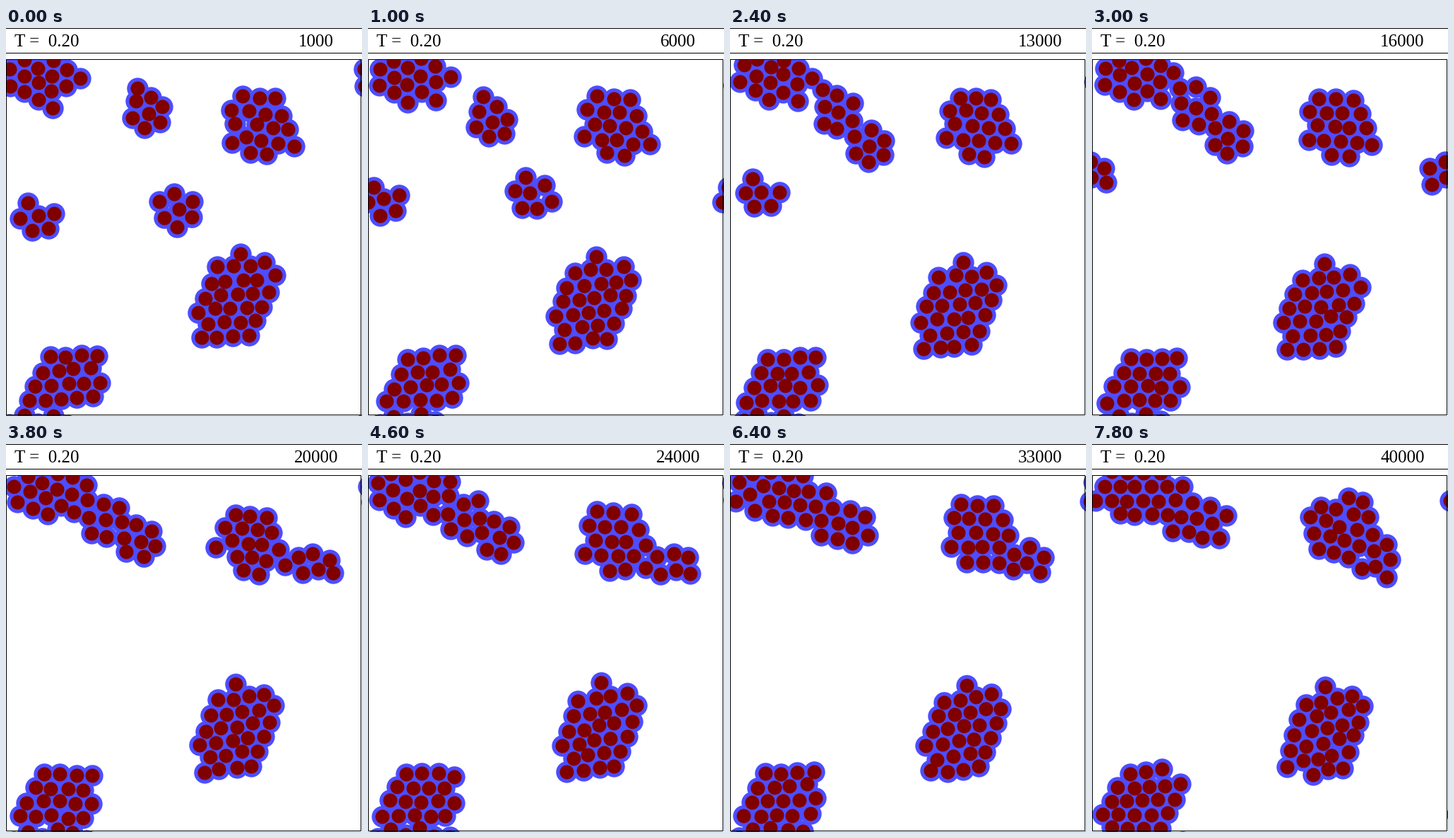
A matplotlib script that plays this animation: 504x548 px, repeating every 8 s.

```python
import numpy as np
import matplotlib.pyplot as plt
from matplotlib.animation import FuncAnimation
from matplotlib.patches import Rectangle

W, H, DPI = 504, 548, 100
PX = 72 / DPI
FRAMES, INTERVAL = 40, 200
SIDE = 502                       # edge of the periodic box
ORIGIN = np.array([0.5, 44.5])
BLUE, RED = "#4d4dff", "#800000"
GAP = 23                         # resting distance between two discs
PULL = 0.01                      # cohesion towards the cluster centre
rng = np.random.default_rng(12)


class Cluster:
    """A packed, tilted ellipse of discs that drifts along a few waypoints."""

    def __init__(self, count, tilt, aspect, way):
        self.count, self.way = count, way
        a = np.radians(tilt)
        turn = np.array([[np.cos(a), -np.sin(a)], [np.sin(a), np.cos(a)]])
        self.stiff = PULL * turn @ np.diag([1 / aspect, aspect]) @ turn.T
        self.shape = turn @ np.diag([aspect ** 0.5, aspect ** -0.5])

    def centre(self, k):
        return np.array([np.interp(k, list(self.way), axis)
                         for axis in zip(*self.way.values())])

    def seed(self):
        """Sunflower filling of the ellipse."""
        i = np.arange(self.count)
        r, a = 0.52 * GAP * np.sqrt(i + 0.5), i * np.pi * (3 - 5 ** 0.5)
        disc = np.column_stack([r * np.cos(a), r * np.sin(a)])
        return self.centre(0) + disc @ self.shape.T


clusters = [
    Cluster(18, -30, 1.35, {0: (86, 496), 12: (76, 502), 39: (71, 500)}),
    Cluster(15, 5, 1.4, {0: (50, 575), 5: (63, 571), 39: (60, 568)}),
    Cluster(8, 60, 1.3, {0: (199, 115), 5: (172, 127), 12: (148, 113),
                         39: (114, 86)}),
    Cluster(18, 35, 1.15, {0: (360, 138), 5: (351, 138), 19: (349, 140),
                           39: (356, 119)}),
    Cluster(6, 0, 1.4, {0: (42, 269), 5: (22, 245), 12: (41, 234),
                        19: (-62, 170), 39: (-107, 160)}),
    Cluster(7, 0, 1.2, {0: (242, 257), 5: (234, 234), 12: (198, 165),
                        19: (185, 133), 39: (155, 111)}),
    Cluster(28, -56, 1.4, {0: (325, 382), 5: (318, 388), 19: (325, 403),
                           39: (332, 407)}),
]
counts = [c.count for c in clusters]
stiff = np.repeat([c.stiff for c in clusters], counts, axis=0)


def centres(k):
    return np.repeat([c.centre(k) for c in clusters], counts, axis=0)


def repel(pts):
    """Push close pairs apart across the periodic box."""
    d = pts[:, None] - pts[None]
    d -= SIDE * np.round(d / SIDE)
    r = np.hypot(d[..., 0], d[..., 1])
    np.fill_diagonal(r, GAP)
    push = np.clip(GAP - r, 0, None) / np.maximum(r, 1)
    return pts + 0.25 * (push[..., None] * d).sum(1)


def settle(pts, mid, steps):
    for _ in range(steps):
        pts = repel(pts + np.einsum("nij,nj->ni", stiff, mid - pts))
    for _ in range(8):
        pts = repel(pts)
    return pts


def simulate():
    mid = centres(0)
    pts = settle(np.vstack([c.seed() for c in clusters]), mid, 200)
    path = []
    for k in range(FRAMES):
        drift = centres(k) - mid
        mid = mid + drift
        pts = settle(pts + drift + rng.normal(0, 4, pts.shape), mid, 40)
        path.append(pts + rng.normal(0, 1.1, pts.shape))
    return path


path = simulate()
tiles = SIDE * np.array([(i, j) for i in (-1, 0, 1) for j in (-1, 0, 1)])

fig = plt.figure(figsize=(W / DPI, H / DPI), dpi=DPI, facecolor="white")
ax = fig.add_axes([0, 0, 1, 1])
ax.set_xlim(0, W)
ax.set_ylim(H, 0)
ax.axis("off")


def discs(radius, color, z):
    dots = ax.scatter([], [], s=(2 * radius * PX) ** 2, color=color,
                      linewidths=0, zorder=z)
    dots.set_clip_path(Rectangle((0, 44), W, 503, transform=ax.transData))
    return dots


rims, cores = discs(15.2, BLUE, 1), discs(10, RED, 2)
for y in (0.5, 35.5):
    ax.plot([0, W], [y, y], color="black", lw=PX, snap=False)
ax.add_patch(Rectangle(ORIGIN, SIDE, SIDE, fill=False, ec="black", lw=PX,
                       snap=False, zorder=3))

font = dict(family="Liberation Serif", size=25 * PX, va="baseline", ha="left")
ax.text(11.5, 26, "T =  0.20", **font)
counter = ax.text(0, 26, "", **font)


def draw(k):
    pts = (path[k] - ORIGIN) % SIDE + ORIGIN
    images = (pts[None] + tiles[:, None]).reshape(-1, 2)
    rims.set_offsets(images)
    cores.set_offsets(images)
    label = str(1000 * (k + 1))
    counter.set_text(label)
    counter.set_x(439.3 - 6.25 * len(label))
    return rims, cores, counter


anim = FuncAnimation(fig, draw, frames=FRAMES, interval=INTERVAL, repeat=True)
plt.show()
```
